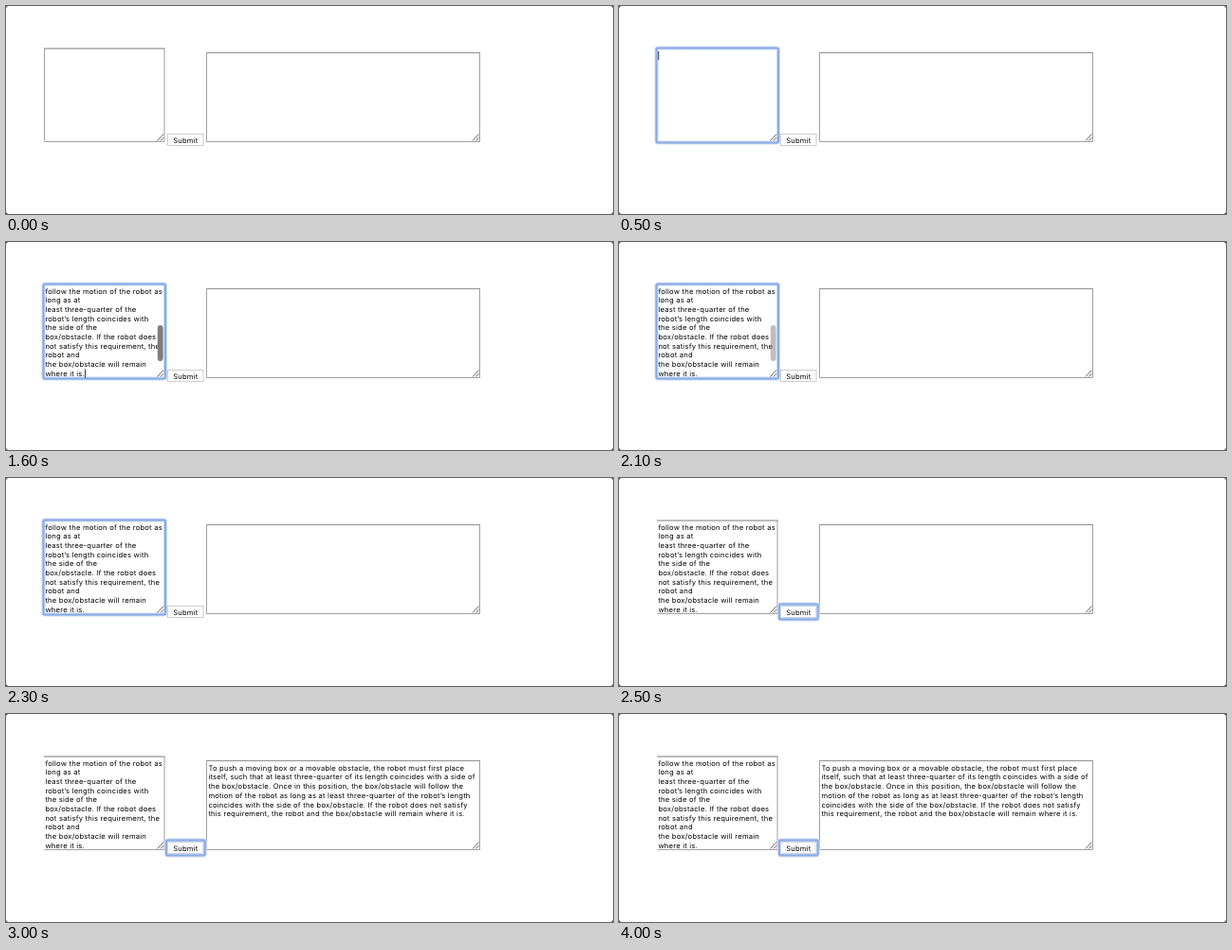
An HTML page for the animation above (4700 ms loop, 640 px wide and 220 px high).

```html
<!DOCTYPE html>
<html lang="en">
<head>
<meta charset="utf-8">
<title>Text cleaner</title>
<style>
  html, body { margin: 0; width: 100%; height: 100%; overflow: hidden; background: #fff; }
  svg { display: block; width: 640px; height: 220px; }
  text {
    font: 7.6px Inter, Roboto, sans-serif; letter-spacing: .22px;
    text-rendering: geometricPrecision; fill: #000; white-space: pre;
  }
  .frame, .grip, .ring { fill: none; }
  .frame { stroke: #a0a0a0; }
  .grip { stroke: #555; stroke-width: .9; }
  .caret { fill: #222; }
</style>
</head>
<body>
<svg id="stage" viewBox="0 0 640 220"></svg>
<script>
const LOOP = 4700;
const stage = document.getElementById('stage');

const pasted = [
  'follow the motion of the robot as',
  'long as at',
  'least three-quarter of the',
  'robot’s length coincides with',
  'the side of the',
  'box/obstacle. If the robot does',
  'not satisfy this requirement, the',
  'robot and',
  'the box/obstacle will remain',
  'where it is.'
];
const cleaned = [
  'To push a moving box or a movable obstacle, the robot must first place',
  'itself, such that at least three-quarter of its length coincides with a side of',
  'the box/obstacle. Once in this position, the box/obstacle will follow the',
  'motion of the robot as long as at least three-quarter of the robot’s length',
  'coincides with the side of the box/obstacle. If the robot does not satisfy',
  'this requirement, the robot and the box/obstacle will remain where it is.'
];

function add(tag, attrs, parent = stage) {
  const el = document.createElementNS('http://www.w3.org/2000/svg', tag);
  for (const key in attrs) el.setAttribute(key, attrs[key]);
  parent.appendChild(el);
  return el;
}

function rect(x, y, width, height, attrs, parent) {
  return add('rect', { x, y, width, height, ...attrs }, parent);
}

function paragraph(lines, x, y) {
  const group = add('g', {});
  lines.forEach((line, i) => {
    add('text', { x, y: y + i * 9.68 }, group).textContent = line;
  });
  return group;
}

// Returns the left edge, which can be hidden on its own.
function textarea(x, y, w, h, topColor) {
  add('path', { class: 'frame', d: `M${x} ${y + h}h${w}v${-h}` });
  add('path', { d: `M${x - .5} ${y}h${w + 1}`, stroke: topColor });
  return add('path', { class: 'frame', d: `M${x} ${y}v${h}` });
}

function grip(x, y) {
  add('path', { class: 'grip', d: `M${x - 7.5} ${y - 1.5}l6.5-7M${x - 4} ${y - 1.5}l3-3.3` });
}

function focusRing(x, y, w, h) {
  const group = add('g', { class: 'ring' });
  rect(x, y, w, h, { rx: 2, stroke: '#c9d9f5', 'stroke-width': 4 }, group);
  rect(x, y, w, h, { rx: 1.5, stroke: '#8aabe5', 'stroke-width': 2 }, group);
  return group;
}

// Window corners
add('path', { d: 'M0 0h2L0 2zM640 0h-2l2 2zM0 220h2l-2-2zM640 220h-2l2-2z', fill: '#555' });

const leftEdge = textarea(40.5, 45, 126.5, 98.5, '#7c7c7c');
textarea(211.5, 49.5, 288, 94, '#909090');
const areaRing = focusRing(39.5, 44.5, 128.5, 100);
const inputText = paragraph(pasted, 41.4, 54.6);
const outputText = paragraph(cleaned, 213.4, 59.8);
const thumb = rect(159.8, 88, 5.8, 38, { rx: 2.9, fill: '#7d7d7d' });
grip(167, 144);
grip(499.5, 144);

rect(170.5, 135.5, 37.5, 12, { fill: '#fff', stroke: '#c8c8c8', 'stroke-width': .9 });
const buttonRing = focusRing(169, 133.5, 40.7, 16);
add('text', { x: 176.2, y: 144.5 }).textContent = 'Submit';
const caret = rect(41.3, 48, .9, 9.2, { class: 'caret' });

function show(el, opacity) {
  el.setAttribute('opacity', Number(opacity));
}

function render(t) {
  const hasText = t >= 1600;
  const blurred = t >= 2500;
  const focused = t >= 400 && !blurred;
  const caretOn = (t >= 500 && t < 900) || (t >= 1400 && t < 2100);
  const fade = t < 2000 ? 1 : Math.max(0, 1 - (Math.floor((t - 2000) / 100) + 1) / 4);

  show(areaRing, focused ? (t < 500 ? .5 : 1) : 0);
  show(leftEdge, !blurred);
  show(inputText, hasText);
  show(thumb, hasText ? fade : 0);
  show(buttonRing, blurred);
  show(outputText, t >= 3000);
  show(caret, caretOn);
  caret.setAttribute('x', hasText ? 83 : 41.3);
  caret.setAttribute('y', hasText ? 134.4 : 48);
}

const start = performance.now();
function tick() {
  render((performance.now() - start) % LOOP);
  requestAnimationFrame(tick);
}
tick();
</script>
</body>
</html>
```
